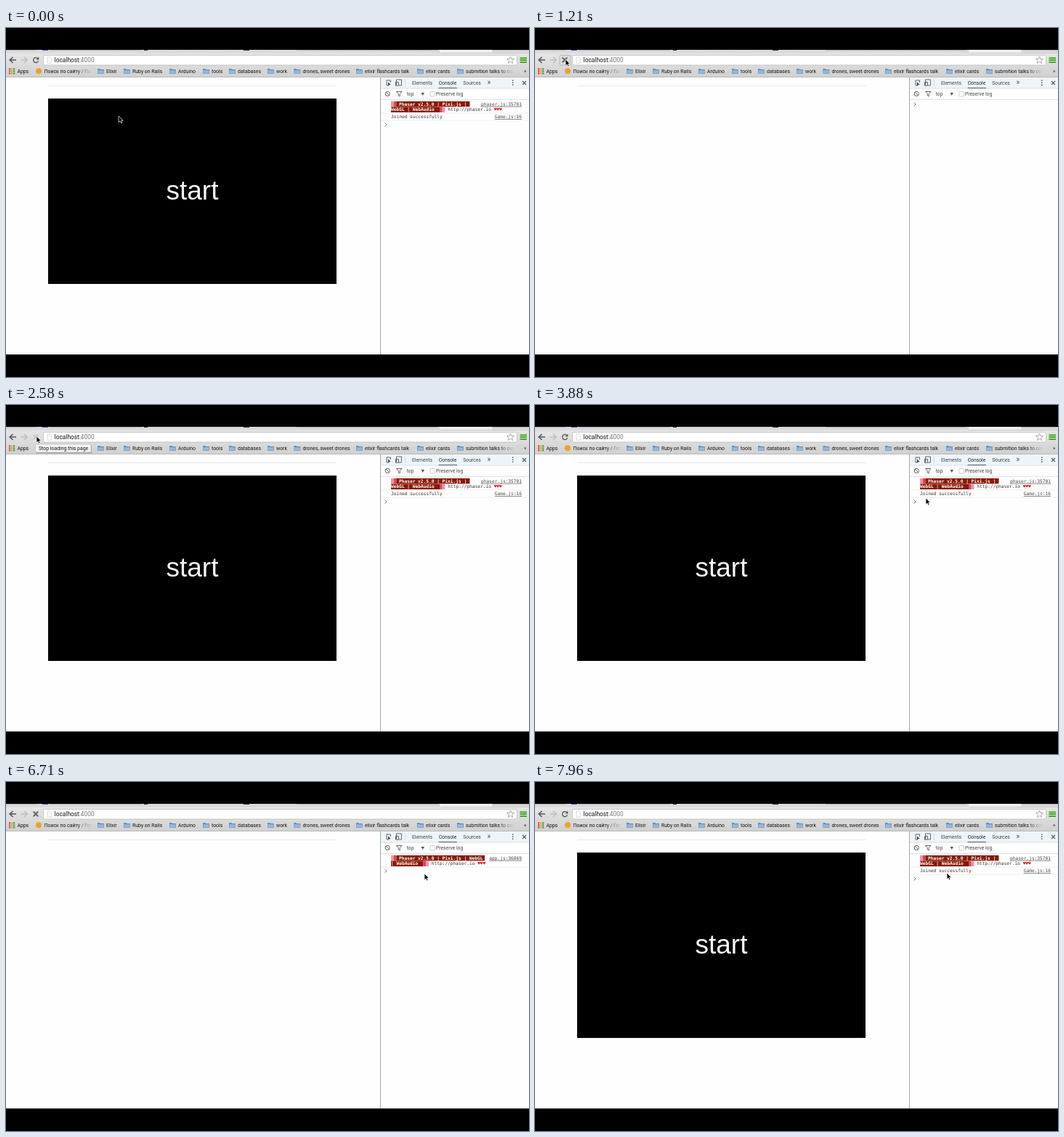
These frames come from a looping animation (720x480 px, 8 s). An HTML page:

```html
<!DOCTYPE html>
<html lang="en">
<head>
<meta charset="utf-8">
<title>Page reload</title>
<style>
  html, body { margin: 0; width: 100%; height: 100%; overflow: hidden; background: #000; }
  svg { display: block; width: 720px; height: 480px; }
  text { font-family: Roboto, sans-serif; font-size: 6.9px; fill: #151515; white-space: pre; }
  .mono, .mono text { font-family: "DejaVu Sans Mono", monospace; font-size: 6.2px; fill: #333; }
  .mono .white { fill: #fff; font-weight: bold; }
  .mono .link { text-anchor: end; text-decoration: underline; fill: #444; }
  .mono .heart { fill: #d8232f; }
  .tools text { font-size: 6.75px; fill: #444; }
  .line { fill: none; stroke: #555; }
</style>
</head>
<body>
<svg viewBox="0 0 720 480">
  <defs>
    <linearGradient id="bar" x2="0" y2="1"><stop stop-color="#e9e9e9"/><stop offset="1" stop-color="#d0d0d0"/></linearGradient>
    <linearGradient id="fadeLeft" gradientUnits="userSpaceOnUse" x1="98" x2="119"><stop stop-color="#151515"/><stop offset="1" stop-color="#151515" stop-opacity="0"/></linearGradient>
    <linearGradient id="fadeRight" gradientUnits="userSpaceOnUse" x1="678" x2="699"><stop stop-color="#151515"/><stop offset="1" stop-color="#151515" stop-opacity="0"/></linearGradient>
    <g id="folder"><path d="M0 1.2Q0 .4.8.4H3L4 1.5H8.2Q9 1.5 9 2.3V7.2H0Z" fill="#5f8fbd"/><path d="M.5 2.7H8.5V6.7H.5Z" fill="#93b9de"/></g>
  </defs>

  <!-- page -->
  <rect y="30" width="720" height="419" fill="#fefefe"/>
  <path d="M58 79.5H455" stroke="#e6e6e6"/>
  <g id="game">
    <rect x="58" y="97" width="397" height="255"/>
    <text x="220.5" y="235.5" style="font:37px 'Liberation Sans',Arial,sans-serif;fill:#f8f8f8">start</text>
  </g>

  <!-- browser -->
  <rect y="30" width="720" height="38" fill="url(#bar)"/>
  <rect y="30" width="720" height="4.5" fill="#dcd8dd"/>
  <path d="M0 30.5H42M60 30.5H186M400 30.5H594M670 30.5H720" stroke="#b7b2ba"/>
  <path d="M50 30.5H58" stroke="#3b50a8"/>
  <path d="M327 30.5H335M190 30.5H195" stroke="#222"/>
  <path d="M594 30Q596 34.5 600 34.5H720" fill="none" stroke="#c4c4c4" stroke-width=".6"/>
  <rect x="597" y="30" width="72" height="4" fill="#efefef"/>
  <path d="M14 44H5.5M9.5 40L5.2 44L9.5 48" class="line" stroke-width="1.6"/>
  <path d="M20.5 44H29M25 40L29.3 44L25 48" class="line" style="stroke:#bdbdbd" stroke-width="1.5"/>
  <rect id="hover" x="34" y="37.5" width="15" height="13.5" rx="1" fill="#dcdcdc" stroke="#a9a9a9" stroke-width=".7"/>
  <g id="reload"><path d="M44 42.1A3.5 3.5 0 1 0 44.5 45.2" class="line" stroke-width="1.3"/><path d="M45.3 39.8V43.6H41.5Z" fill="#555"/></g>
  <path id="stop" d="M37.7 40.7L44.3 47.3M44.3 40.7L37.7 47.3" class="line" stroke-width="1.7"/>
  <path id="stopOff" d="M37.7 40.7L44.3 47.3M44.3 40.7L37.7 47.3" class="line" style="stroke:#bcbcbc" stroke-width="1.5"/>
  <rect x="51.5" y="37.5" width="652" height="13.5" rx="1.5" fill="#fff" stroke="#b8b8b8" stroke-width=".7"/>
  <path d="M57 40H60.5L62.5 42V48.3H57Z" fill="#fafafa" stroke="#c6c6c6" stroke-width=".6"/>
  <text x="66.6" y="47.2" style="font-size:8.4px">localhost<tspan fill="#777">:4000</tspan></text>
  <path d="M694.5 39L695.8 42.4L699.5 42.6L696.6 45L697.6 48.6L694.5 46.5L691.4 48.6L692.4 45L689.5 42.6L693.2 42.4Z" fill="#fff" stroke="#888" stroke-width=".7"/>
  <path d="M707.5 41.3H717M707.5 44.2H717M707.5 47.1H717" stroke="#36a313" stroke-width="1.8"/>
  <path d="M0 67.6H720" stroke="#b2b2b2" stroke-width=".8"/>
  <g id="bookmarks">
    <text x="15.4" y="62">Apps</text>
    <circle cx="45" cy="59.3" r="4" fill="#e5a52c"/>
    <text x="52.6" y="62" style="fill:url(#fadeLeft)">Поиск по сайту / Гот</text>
    <text x="633" y="62" style="fill:url(#fadeRight)">submition talks to con</text>
    <text x="713" y="62">»</text>
  </g>
  <g id="tooltip">
    <rect x="41" y="55" width="77" height="11.5" rx="1.5" opacity=".22"/>
    <rect x="40.5" y="54" width="76.5" height="11" rx="1.5" fill="#f3f3f3" stroke="#b5b5b5" stroke-width=".6"/>
    <text x="45" y="62">Stop loading this page</text>
  </g>

  <!-- developer tools -->
  <g class="tools">
    <rect x="516" y="68" width="204" height="15" fill="#edf5fa"/>
    <path d="M516 83H720M516 98.3H720" stroke="#d5d9dc" stroke-width=".8"/>
    <path d="M515.5 68V449" stroke="#a5a5a5"/>
    <path d="M595.5 82.5H621" stroke="#5b6f84" stroke-width="1.2"/>
    <path d="M527 79H524V72H529.5V75M537.5 78.5V71H544.5V79H541M536.5 74.5H540.5V79.3H536.5Z" class="line" stroke-width=".9"/>
    <path d="M526 74.5V79.5L527.4 78.2L529.6 78Z" fill="#333"/>
    <path d="M549.5 71V80" stroke="#ccc" stroke-width=".7"/>
    <text x="559" y="78">Elements</text>
    <text x="595.7" y="78" style="fill:#222">Console</text>
    <text x="629.3" y="78">Sources</text>
    <text x="662.4" y="78" style="font-size:10px">»</text>
    <path d="M697.7 71.6V80" class="line" stroke-width="1.5" stroke-dasharray="1.5 1.4"/>
    <path d="M711 73L716 78M716 73L711 78" class="line" stroke-width="1.1"/>
    <circle cx="525.3" cy="90.5" r="3.1" class="line"/>
    <path d="M523.1 88.3L527.5 92.7M537.5 87.5H545L542.2 90.5V94L540.3 93V90.5Z" class="line" stroke-width=".9"/>
    <text x="551.7" y="93">top</text>
    <path d="M571.5 89H576L573.7 93Z" fill="#555"/>
    <rect x="584" y="87.5" width="6.5" height="6.5" rx="1" fill="#fff" stroke="#bbb" stroke-width=".7"/>
    <text x="592" y="93">Preserve log</text>
  </g>
  <g class="mono">
    <g id="bundleLog"></g>
    <g id="sourceLog"></g>
    <g id="joined">
      <text x="530" y="124.2">Joined successfully</text>
      <text x="710" y="124.2" class="link">Game.js:16</text>
      <path d="M516 127.2H720" stroke="#ececec" stroke-width=".8"/>
    </g>
  </g>
  <g id="prompt"><path d="M521.7 102.6L524.1 105L521.7 107.4" fill="none" stroke="#4a72ad" stroke-width="1"/></g>

  <rect width="720" height="30"/>
  <rect y="449" width="720" height="31"/>
  <g id="cursor"><path d="M0 0V8.7L2 6.9L3.5 10L5 9.3L3.6 6.3H6.2Z" stroke="#fff" stroke-width=".7"/></g>
</svg>
<script>
const LOOP = 8000;
const $ = id => document.getElementById(id);

// Bookmarks bar
const folders = { 'Elixir': 126, 'Ruby on Rails': 162, 'Arduino': 225, 'tools': 271, 'databases': 307, 'work': 360,
  'drones, sweet drones': 396.4, 'elixir flashcards talk': 482, 'elixir cards': 566, '': 621 };
let bar = '';
for (const [name, x] of Object.entries(folders))
  bar += `<use href="#folder" x="${x}" y="55.5"/><text x="${x + 12}" y="62">${name}</text>`;
const dots = ['#d9453a', '#e0a52b', '#3f9c4e', '#4778c9'];
for (let i = 0; i < 9; i++)
  bar += `<rect x="${4 + i % 3 * 3}" y="${55.3 + Math.floor(i / 3) * 3}" width="2.2" height="2.2" fill="${dots[(i + Math.floor(i / 3)) % 4]}"/>`;
$('bookmarks').insertAdjacentHTML('beforeend', bar);

// Two-line console banner, wrapped at a different word depending on the link's length
function banner(id, first, firstEnd, second, secondEnd, link) {
  const block = (x, y, w, fill) => `<rect x="${x}" y="${y}" width="${w}" height="7.5" fill="${fill}"/>`;
  const pink = '#fb8cb3', red = '#d44a52', dark = '#871905';
  $(id).innerHTML =
    block(530, 100.8, 3.7, pink) + block(533.7, 100.8, 3.7, red) + block(537.4, 100.8, firstEnd - 537.4, dark) +
    block(530, 108.5, secondEnd - 530, dark) + block(secondEnd, 108.5, 3.7, red) + block(secondEnd + 3.7, 108.5, 3.7, pink) +
    `<text class="white" x="541" y="106.8">${first}</text><text class="white" x="530" y="114.3">${second}</text>
     <text x="${secondEnd + 11.3}" y="114.3">http://phaser.io <tspan class="heart">♥♥♥</tspan></text>
     <text class="link" x="710" y="106.8">${link}</text>
     <path d="M516 117H720" stroke="#ececec" stroke-width=".8"/>`;
}
banner('bundleLog', 'Phaser v2.5.0 | Pixi.js | WebGL', 659, '| WebAudio', 574.5, 'app.js:36869');
banner('sourceLog', 'Phaser v2.5.0 | Pixi.js |', 638.5, 'WebGL | WebAudio', 597, 'phaser.js:35701');

// Tracks: each step is [time, value]
function play(el, steps, style, easing) {
  const all = [...steps, [LOOP, steps.at(-1)[1]]];
  el.animate(all.map(([t, v]) => ({ offset: t / LOOP, easing, ...style(v) })), { duration: LOOP, iterations: Infinity });
}
const show = (id, ...steps) => play($(id), steps, v => ({ opacity: v }), 'steps(1, end)');
const at = (x, y) => ({ transform: `translate(${x}px, ${y}px)` });

show('game', [0, 1], [1000, 0], [1800, 1], [6020, 0], [6850, 1]);
show('sourceLog', [0, 1], [1000, 0], [1800, 1], [6020, 0], [6850, 1]);
show('joined', [0, 1], [1000, 0], [1880, 1], [6020, 0], [6930, 1]);
show('bundleLog', [0, 0], [1580, 1], [1800, 0], [6560, 1], [6850, 0]);
show('reload', [0, 1], [960, 0], [2650, 1], [5980, 0], [6850, 1]);
show('stop', [0, 0], [960, 1], [1800, 0], [5980, 1], [6850, 0]);
show('stopOff', [0, 0], [1800, 1], [2650, 0]);
show('hover', [0, 0], [720, 1], [1800, 0], [4960, 1], [6130, 0]);
show('tooltip', [0, 0], [1900, 1], [2680, 0]);
play($('prompt'), [[0, 28], [1000, 0], [1580, 17.5], [1880, 28], [6020, 0], [6560, 17.5], [6930, 28]],
  y => at(0, y), 'steps(1, end)');
play($('cursor'), [[0, [155, 121]], [80, [155, 121]], [760, [42, 43]], [2600, [42, 43]], [3280, [540, 130]],
  [3880, [538, 128]], [4250, [538, 128]], [5000, [44, 41]], [6090, [44, 41]], [6620, [576, 126]],
  [7500, [576, 126]], [7900, [567, 125]]], p => at(...p), 'ease-in-out');
</script>
</body>
</html>
```
